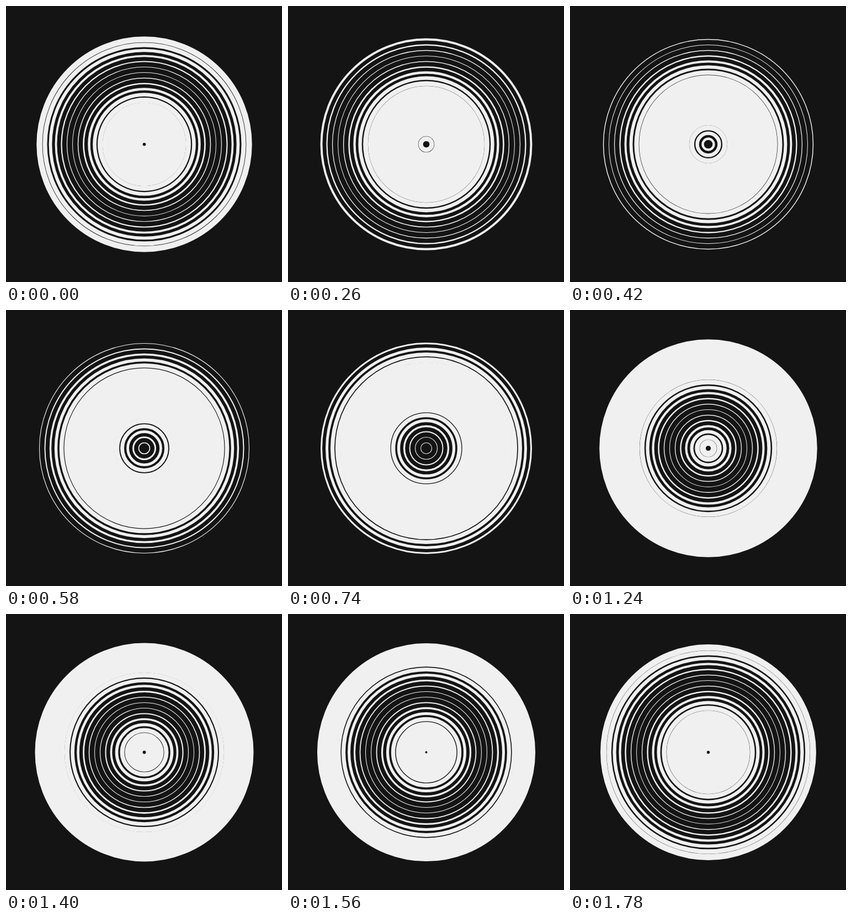
Animation, 500 px wide and 500 px high, one loop 1.8 s. Source, as an HTML page with a canvas:

```html
<!DOCTYPE html>
<html lang="en">
<head>
<meta charset="utf-8">
<title>Concentric rings</title>
<style>
  html, body { margin: 0; width: 100%; height: 100%; overflow: hidden; background: #141414; }
  canvas { display: block; }
</style>
</head>
<body>
<canvas id="stage" width="500" height="500"></canvas>
<script>
const ctx = document.getElementById('stage').getContext('2d');
const LOOP = 1800, STEP = 20, RINGS = 19, WAVE = 20, CENTER = 250.5;

function draw(ms) {
  const t = Math.floor((ms % LOOP) / STEP) * STEP / LOOP;
  const thinnest = 13.2 + WAVE * t; // ring index where the line is thinnest
  ctx.fillStyle = '#141414';
  ctx.fillRect(0, 0, 500, 500);
  ctx.strokeStyle = '#f0f0f0';
  for (let k = 1; k <= RINGS; k++) {
    ctx.lineWidth = 8.5 - 7.5 * Math.cos((k - thinnest) * 2 * Math.PI / WAVE);
    ctx.beginPath();
    ctx.arc(CENTER, CENTER, 10 * k, 0, 2 * Math.PI);
    ctx.stroke();
  }
}

const start = performance.now();
function frame() {
  draw(performance.now() - start);
  requestAnimationFrame(frame);
}
frame();
</script>
</body>
</html>
```
